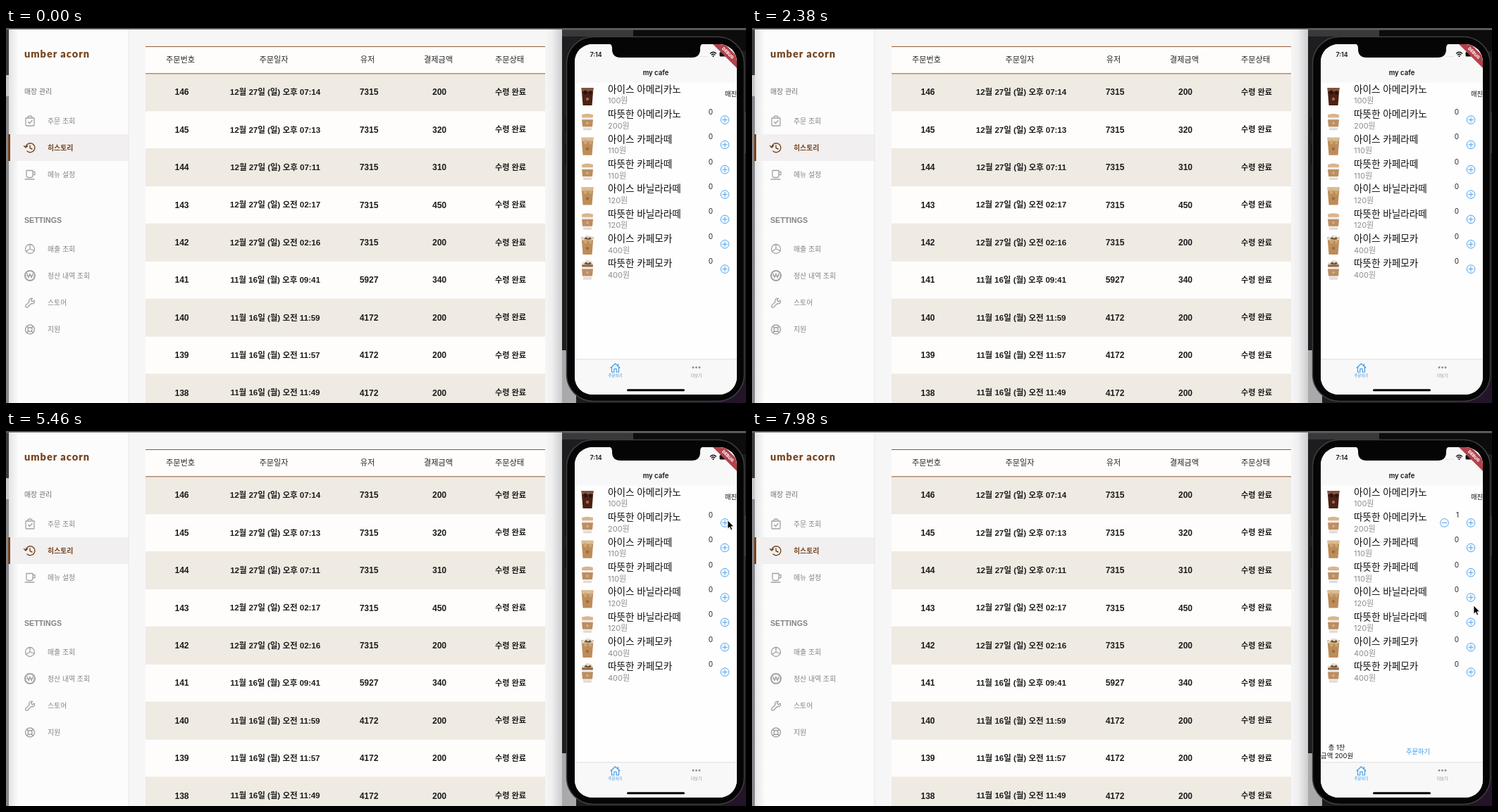
Write an HTML page that moves like this. It is 1050 px wide and 533 px high and loops after 8 s.

```html
<!DOCTYPE html>
<html lang="ko">
<head>
<meta charset="utf-8">
<title>Cafe orders</title>
<style>
html, body { margin: 0; width: 100%; height: 100%; overflow: hidden; background: #1d1d1f; }
svg { display: block; width: 100%; height: 100%; }
text { font-family: "Liberation Sans", "Noto Sans CJK KR", "Noto Sans CJK", sans-serif; }
.phone text { font-family: Inter, "Noto Sans CJK KR", "Noto Sans CJK", sans-serif; }
.logo { font-family: Lato, sans-serif; letter-spacing: 1px; }
.line { fill: none; stroke-linecap: round; stroke-linejoin: round; }
</style>
</head>
<body>
<svg id="stage" viewBox="0 0 1050 533" preserveAspectRatio="none">
<defs>
  <linearGradient id="shade"><stop offset="0" stop-color="#f7f6f7"/><stop offset=".4" stop-color="#efeff0"/><stop offset="1" stop-color="#cdcdcf"/></linearGradient>
  <linearGradient id="edge"><stop offset="0" stop-color="#e4e3e4"/><stop offset="1" stop-color="#fdfcfc"/></linearGradient>
  <clipPath id="screen"><rect x="807" y="23" width="230" height="498" rx="25"/></clipPath>
</defs>
</svg>
<script>
const BROWN = '#74431d', BLUE = '#3a97e8', GRAY = '#a3a1a1';

const rect = (x, y, w, h, fill, more = '') =>
  `<rect x="${x}" y="${y}" width="${w}" height="${h}" fill="${fill}" ${more}/>`;
const path = (d, fill, more = '') => `<path d="${d}" fill="${fill}" ${more}/>`;
const line = (d, color, width = 1) =>
  `<path class="line" d="${d}" stroke="${color}" stroke-width="${width}"/>`;
const ring = (x, y, r, color, width = 1) =>
  `<circle cx="${x}" cy="${y}" r="${r}" fill="none" stroke="${color}" stroke-width="${width}"/>`;
// y is the middle of the line of text
const text = (s, x, y, size, fill = '#111', weight = 400, anchor = 'start', more = '') =>
  `<text x="${x}" y="${y + size * .36}" font-size="${size}" fill="${fill}" font-weight="${weight}" text-anchor="${anchor}" ${more}>${s}</text>`;
const mid = (s, x, y, size, fill, weight) => text(s, x, y, size, fill, weight, 'middle');
const at = (x, y, body) => `<g transform="translate(${x} ${y})">${body}</g>`;

function desktop() {
  return rect(0, 0, 1050, 533, '#1d1d1f') +
    rect(0, 0, 890, 12, '#39393b') + rect(890, 3, 160, 30, '#0c0c0d') +
    rect(0, 0, 1050, 3, '#59595b') +
    rect(0, 3, 4, 64, '#3d3d40') + rect(0, 67, 4, 30, '#c9c9cc') + rect(0, 97, 4, 436, '#85868a') +
    rect(789, 458, 20, 75, '#a9a9ac') + rect(1000, 500, 50, 33, '#24142a');
}

function icons() {
  const g = GRAY;
  const bag = line('M-6-4H6V6Q6 7 5 7H-5Q-6 7-6 6ZM-3-4V-5Q-3-7 0-7T3-5V-4M-2.5 1.5L-.5 3.5L3-.5', g, 1.3);
  const past = line('M-6-1A6.5 6.5 0 1 1-4 5M-8.5-2.5L-6 0L-3.5-2.5M0-3V.5L3 2', BROWN, 1.4);
  const cup = line('M-5-6H4V1Q4 4 1 4H-2Q-5 4-5 1ZM4-4H7V0H4M-7 6.5H6', g, 1.3);
  const pie = ring(0, 0, 6.5, g, 1.3) + line('M0-6.5V0L-5.5 3.5M0 0L6 2.5', g, 1.3);
  const won = ring(0, 0, 7, g, 2) + line('M-4-3L-2 3L0-3L2 3L4-3M-5 0H5', g, 1.2);
  const wrench = line('M6-3.5L3.5-1.5L1.5-3.5L3.5-6.2Q0-7-1.2-4Q-1.7-2.4-1-1.2L-6 3.6Q-7 5-5.8 6.2T-3.2 6.2L1.8 1.2Q5.5 2 6.5-1Q6.8-2.2 6-3.5Z', g, 1.3);
  const buoy = ring(0, 0, 6.5, g, 1.4) + ring(0, 0, 3, g, 1.3) +
    line('M-4.5-4.5L-2-2M4.5-4.5L2-2M-4.5 4.5L-2 2M4.5 4.5L2 2', g, 1.6);
  return [bag, past, cup, pie, won, wrench, buoy];
}

function sidebar() {
  const items = [['주문 조회', 132], ['히스토리', 170], ['메뉴 설정', 208.5], ['매출 조회', 314],
    ['정산 내역 조회', 352], ['스토어', 390.5], ['지원', 428.5]];
  const pics = icons();
  return rect(4, 2, 170, 531, '#fdfcfc') + rect(4, 2, 14, 531, 'url(#edge)') +
    rect(4, 151, 170, 38, '#f1efef') + rect(3, 151, 3, 38, BROWN) + rect(173.5, 2, 1, 531, '#e6e5e8') +
    text('umber acorn', 26, 36.5, 14.5, BROWN, 900, 'start', 'class="logo"') +
    text('매장 관리', 26, 90, 9.9, '#6f6b6b', 500) +
    text('SETTINGS', 26, 273, 10.6, '#858183', 700) +
    items.map(([name, y], i) => at(34, y, pics[i]) +
      text(name, 59, y, 9.9, i == 1 ? BROWN : '#858282', i == 1 ? 700 : 400)).join('');
}

function table() {
  const cols = [['주문번호', 247.5], ['주문일자', 380], ['유저', 513], ['결제금액', 613.5], ['주문상태', 714.5]];
  const sunday = '12월 27일 (일) ', monday = '11월 16일 (월) ';
  const rows = [
    [sunday + '오후 07:14', 7315, 200], [sunday + '오후 07:13', 7315, 320],
    [sunday + '오후 07:11', 7315, 310], [sunday + '오전 02:17', 7315, 450],
    [sunday + '오전 02:16', 7315, 200], [monday + '오후 09:41', 5927, 340],
    [monday + '오전 11:59', 4172, 200], [monday + '오전 11:57', 4172, 200],
    [monday + '오전 11:49', 4172, 200]];
  const pitch = 53.4;
  let out = rect(174, 2, 615, 531, '#f7f6f7') + rect(765, 2, 24, 531, 'url(#shade)') +
    rect(198, 26, 567, 507, '#fefdfc') + cols.map(([s, x]) => mid(s, x, 45, 11.1, '#222', 500)).join('');
  rows.forEach(([date, user, sum], i) => {
    const top = 64.8 + i * pitch, y = 91 + i * pitch;
    out += rect(198, top, 567, pitch, i % 2 ? '#fefdfc' : '#efeae2') + rect(198, top + pitch - .5, 567, 1, '#e9e5df') +
      mid(146 - i, 249.5, y, 12, '#1c1c1c', 700) + mid(date, 382, y, 11.5, '#1c1c1c', 700) +
      mid(user, 515, y, 12, '#1c1c1c', 700) + mid(sum, 615, y, 12, '#1c1c1c', 700) +
      mid('수령 완료', 716, y, 11.1, '#1c1c1c', 700);
  });
  return out + rect(198, 26, 567, 1, '#8f5c38') + rect(198, 64.3, 567, 1, '#8f5c38');
}

function drink(kind) {
  const cream = path('M-8-8Q-8-12-4-12Q-2-16 2-14Q7-14 8-8Z', '#e6dccb') +
    path('M-5-9L-2-12L1-10L4-12L6-9L2-8Z', '#6d5238');
  if (kind == 'hot' || kind == 'hotMocha')
    return path('M-8-9H8L6 13H-6Z', '#f0eeec') + path('M-8-9Q0-12 8-9L7.7-5H-7.7Z', kind == 'hot' ? '#d9b48d' : '#8b6544') +
      path('M-8-2H8L7 8H-7Z', '#bd8e60') + path('M-6 10H6L5.7 13H-5.7Z', '#dedbd8') +
      '<circle cy="3" r="1.8" fill="#d5b08b"/>' + (kind == 'hotMocha' ? cream : '');
  const body = kind == 'black' ? '#4d2115' : '#bd8d58';
  return path('M-8.5-12H8.5L6.5 13H-6.5Z', body) + path('M-8.5-12H8.5L8-7H-8Z', kind == 'black' ? '#805441' : '#d9bc95') +
    path('M-6-7L-2-9L0-4L-4-2ZM2-7L6-8L6-3L3-2Z', kind == 'black' ? '#2c100b' : '#cda676') +
    '<circle cy="4" r="2.2" fill="#a06a45"/>' + (kind == 'mocha' ? cream : '');
}

const knob = (x, y, plus) => ring(x, y, 5.8, BLUE, .9) +
  line(`M${x - 3.3} ${y}H${x + 3.3}` + (plus ? `M${x} ${y - 3.3}V${y + 3.3}` : ''), BLUE, .9);

function menu() {
  const items = [['아이스 아메리카노', 100, 'black'], ['따뜻한 아메리카노', 200, 'hot'],
    ['아이스 카페라떼', 110, 'latte'], ['따뜻한 카페라떼', 110, 'hot'],
    ['아이스 바닐라라떼', 120, 'latte'], ['따뜻한 바닐라라떼', 120, 'hot'],
    ['아이스 카페모카', 400, 'mocha'], ['따뜻한 카페모카', 400, 'hotMocha']];
  return items.map(([name, price, kind], i) => {
    const y = 35.35 * i;
    return at(825, 97 + y, drink(kind)) + text(name, 854, 87 + y, 13.6) +
      text(price + '원', 854, 103.5 + y, 11, '#8d8d8d') +
      (i ? text('0', 1000, 84 + y, 10, '#222', 400, 'middle', i == 1 ? 'id="count"' : '') + knob(1020, 95.2 + y, true)
         : text('매진', 1020, 93.5, 9.3));
  }).join('');
}

function phone() {
  const status = text('7:14', 828.5, 38, 8.8, '#111', 600) + mid('my cafe', 922, 64, 9.5, '#111', 600) +
    line('M986 40.5H995', '#bbb', 1).replace('/>', ' stroke-dasharray=".1 2.8"/>') +
    line('M999.5 36Q1003.5 32.5 1007.5 36M1001.3 38Q1003.5 36 1005.7 38', '#111', 1.5) +
    '<circle cx="1003.5" cy="40" r="1.1"/>' + rect(1012.5, 34, 11, 6.5, '#111', 'rx="1.6"');
  const ribbon = path('M1003 23H1020L1037 40V57Z', '#b3424c') +
    `<g transform="translate(1024.5 35.5) rotate(45)">${mid('DEBUG', 0, 0, 6, '#fff', 800)}</g>`;
  const tabs = rect(807, 471, 230, 50, '#f8f8f8') + rect(807, 470.5, 230, .8, '#d6d6d6') +
    line('M858 483L864.5 477L871 483M859.5 482V489H862.8V484.5H866.2V489H869.5V482M868.5 480V477.5', BLUE, 1.1) +
    mid('주문하기', 864.5, 494.3, 5.5, BLUE, 400) +
    [975, 979.5, 984].map(x => `<circle cx="${x}" cy="482.5" r="1.4" fill="#8e8e93"/>`).join('') +
    mid('더보기', 979.5, 494.3, 5.7, '#8e8e93', 400) + rect(881, 513.3, 82, 3, '#000', 'rx="1.5"');
  const order = `<g id="order">${knob(982.5, 130.5, false)}` + mid('총 1잔', 829.5, 449.5, 9.3) +
    text('금액 200원', 807, 462, 9.4) + mid('주문하기', 945, 455.5, 9.3, BLUE, 500) + '</g>';
  return '<g class="phone">' + rect(793, 128, 4, 22, '#111') + rect(793, 163, 4, 32, '#111') +
    rect(1046, 120, 4, 58, '#333336') +
    rect(795.5, 12.5, 252, 518, '#050505', 'rx="38" stroke="#3d3d40" stroke-width="1.5"') +
    '<g clip-path="url(#screen)">' + rect(807, 23, 230, 498, '#fefefe') + rect(807, 23, 230, 54.5, '#f8f8f8') +
    menu() + status + ribbon + tabs + order +
    path('M855 22Q860 23 860 28V30Q860 42 872 42H973Q985 42 985 30V28Q985 23 990 22Z', '#050505') + '</g></g>';
}

const stage = document.getElementById('stage');
stage.innerHTML += desktop() + table() + sidebar() + phone() +
  path('M0 0V12.2L2.8 9.6L4.6 13.8L6.7 12.9L4.9 8.8H8.7Z', '#000', 'id="cursor" stroke="#fff" stroke-width=".8"');

const [cursor, order, count] = ['cursor', 'order', 'count'].map(id => document.getElementById(id));
const SHOW = 2500, CLICK = 5700;
// time, x, y of the pointer tip
const stops = [[SHOW, 386, 327], [3340, 386, 327], [4180, 991, 161], [4500, 991, 161],
  [5100, 1024, 127], [6100, 1024, 127], [6700, 1010, 185], [6960, 1010, 185], [7600, 1024, 248], [8000, 1024, 248]];

function pointer(t) {
  const i = Math.max(1, stops.findIndex(s => s[0] > t));
  const [t0, x0, y0] = stops[i - 1], [t1, x1, y1] = stops[i];
  const u = Math.max(0, (t - t0) / (t1 - t0)), k = u * u * (3 - 2 * u);
  return [x0 + (x1 - x0) * k, y0 + (y1 - y0) * k];
}

function draw(now) {
  const t = now % 8000, ordered = t >= CLICK;
  cursor.setAttribute('visibility', t < SHOW ? 'hidden' : 'visible');
  cursor.setAttribute('transform', `translate(${pointer(t)})`);
  order.setAttribute('visibility', ordered ? 'visible' : 'hidden');
  count.textContent = ordered ? '1' : '0';
  count.setAttribute('x', ordered ? 1001 : 1000);
  requestAnimationFrame(draw);
}
const start = performance.now();
draw(0);
function tick() { }
</script>
</body>
</html>
```
